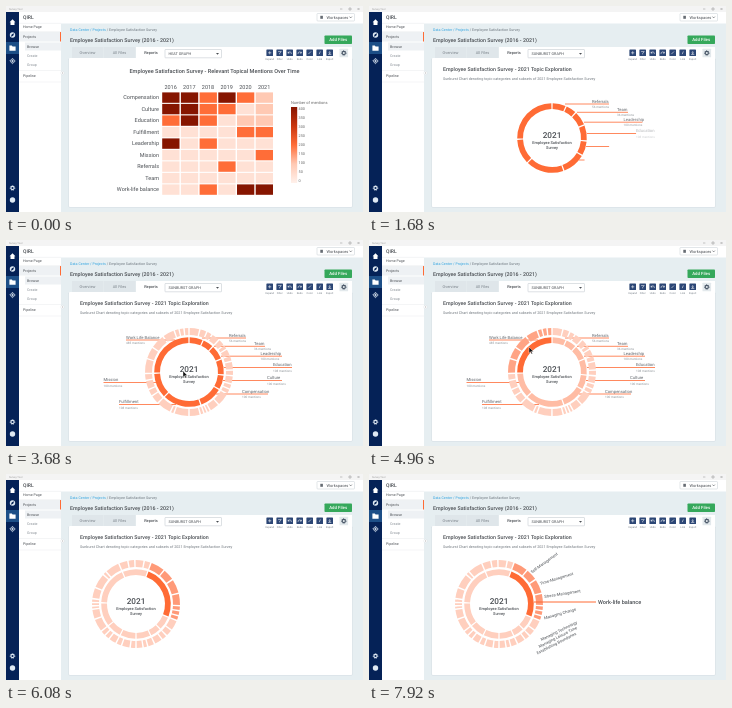
An HTML page that plays this animation: 357x206 px, repeating every 8000 ms.

```html
<!DOCTYPE html>
<html lang="en">
<head>
<meta charset="utf-8">
<title>Survey report</title>
<style>
html, body { margin: 0; width: 100%; height: 100%; overflow: hidden; background: #e6eef1; }
svg { display: block; width: 100vw; height: 100vh; font-family: Roboto, Arial, sans-serif; text-rendering: geometricPrecision; }
</style>
</head>
<body>
<svg id="stage" viewBox="0 0 357 206"></svg>
<script>
const LOOP = 8000;
const ORANGE = '#ff6b35', PALE = '#ffcfbe', SOFT = '#ff9a78', INK = '#4a4e53', NAVY = '#052257';
const stage = document.getElementById('stage');

function el(parent, tag, attrs = {}, content) {
  const node = document.createElementNS('http://www.w3.org/2000/svg', tag);
  for (const key in attrs) node.setAttribute(key, attrs[key]);
  if (content !== undefined) node.textContent = content;
  return parent.appendChild(node);
}
const set = (node, attrs) => { for (const key in attrs) node.setAttribute(key, attrs[key]); };
const group = (parent = stage) => el(parent, 'g');
const rect = (p, x, y, width, height, fill, more) => el(p, 'rect', { x, y, width, height, fill, ...more });
const text = (p, x, y, size, str, fill = INK, more) => el(p, 'text', { x, y, 'font-size': size, fill, ...more }, str);
const stroke = (p, d, color, width, more) => el(p, 'path', { d, fill: 'none', stroke: color, 'stroke-width': width, ...more });
const MID = { 'text-anchor': 'middle' }, END = { 'text-anchor': 'end' }, BOLD = { 'font-weight': 500 };

const clamp = v => Math.min(1, Math.max(0, v));
const ramp = (t, a, b) => clamp((t - a) / (b - a));
const ease = v => v * v * (3 - 2 * v);
const lerp = (a, b, k) => a + (b - a) * k;
const hex = c => [1, 3, 5].map(i => parseInt(c.slice(i, i + 2), 16));
function mix(a, b, k) {
  const x = hex(a), y = hex(b);
  return `rgb(${x.map((v, i) => Math.round(lerp(v, y[i], k)))})`;
}

// Application frame
function drawChrome() {
  const g = group();
  rect(g, 0, 0, 357, 206, '#e6eef1');
  rect(g, 0, 0, 357, 6, '#f4f4f4');
  text(g, 3, 4.2, 2.6, 'Survey Tool', '#999');
  stroke(g, 'M334 3h2.4M343 2h2v2h-2zM351.5 2l2 2m0-2l-2 2', '#777', 0.4);
  rect(g, 13, 6, 344, 11.5, '#fff');
  text(g, 17, 13.4, 5, 'QIRL', INK, BOLD);
  rect(g, 311, 7.5, 37.5, 7.5, '#fff', { stroke: '#b5bfc7', 'stroke-width': 0.4, rx: 0.8 });
  rect(g, 314.3, 9.8, 2.6, 3, '#666c73');
  text(g, 320.5, 12.8, 4, 'Workspaces');
  stroke(g, 'M343.5 10.6l1.2 1.3l1.2-1.3', INK, 0.6);

  rect(g, 0, 6, 13, 200, NAVY);
  rect(g, 0, 36, 13, 12, '#1d4f87');
  el(g, 'path', { d: 'M3.6 16.2L6.5 13.3l2.9 2.9h-.9V19H4.5v-2.8z', fill: '#fff' });
  el(g, 'circle', { cx: 6.5, cy: 29, r: 2.7, fill: '#dfe9f3' });
  el(g, 'path', { d: 'M8.2 27.3l-1 2.4l-2.4 1l1-2.4z', fill: NAVY });
  el(g, 'path', { d: 'M3.4 39.6h2.4l.8.9h3v4.2H3.4z', fill: '#fff' });
  stroke(g, 'M6.5 52.3l2.7 2.7l-2.7 2.7l-2.7-2.7zM6.5 53.5v3M5 55h3', '#dfe9f3', 0.8);
  drawGear(g, 6.5, 182, '#dfe9f3');
  el(g, 'circle', { cx: 6.5, cy: 194, r: 2.7, fill: '#dfe9f3' });

  rect(g, 13, 17, 42, 189, '#fff');
  rect(g, 13, 26, 42, 9.5, '#eef1f4');
  rect(g, 54, 26, 1, 9.5, ORANGE);
  rect(g, 19, 36.5, 36, 8, '#eef1f4');
  stroke(g, 'M13 17.4h42M13 25.6h42M13 64.5h42M13 76h42', '#e2e6e9', 0.4);
  [[17, 22, 'Home Page'], [17, 31.8, 'Projects'], [21, 41.8, 'Browse'], [21, 50.8, 'Create'],
   [21, 59.6, 'Group'], [17, 71.2, 'Pipeline']]
    .forEach(([x, y, s], i) => text(g, x, y, 3.6, s, i == 3 || i == 4 ? '#858c93' : INK));
  el(g, 'circle', { cx: 56.5, cy: 67, r: 1.8, fill: '#fff', stroke: '#ccd4da', 'stroke-width': 0.3 });
  stroke(g, 'M56.9 66.2l-.8.8l.8.8', '#777', 0.4);

  const crumbs = text(g, 64, 25.2, 3.65, 'Data Center / Projects', '#2fa3e0');
  el(crumbs, 'tspan', { fill: '#6b747c' }, ' / Employee Satisfaction Survey');
  text(g, 64, 36.3, 5.3, 'Employee Satisfaction Survey (2016 - 2021)', INK, BOLD);
  rect(g, 318.5, 29.5, 27.5, 8.6, '#35a85b', { rx: 0.8 });
  text(g, 332.2, 35.4, 4.3, 'Add Files', '#fff', { ...MID, ...BOLD });

  rect(g, 62.5, 52.3, 284, 149.3, '#d6dee3', { rx: 1 });
  rect(g, 63, 52, 283, 149, '#fff', { rx: 0.8 });
  rect(g, 66, 41, 31.5, 11, '#dfe6ea');
  rect(g, 98, 41, 31.5, 11, '#dfe6ea');
  rect(g, 130, 41, 216, 12, '#fff');
  text(g, 81.5, 47.8, 3.9, 'Overview', '#7b838a', MID);
  text(g, 113.5, 47.8, 3.9, 'All Files', '#7b838a', MID);
  text(g, 145, 47.8, 3.9, 'Reports', INK, { ...MID, ...BOLD });
  rect(g, 159, 43.5, 56.5, 8.3, '#fff', { stroke: '#aab3ba', 'stroke-width': 0.4, rx: 0.5 });
  el(g, 'path', { d: 'M210 47h3l-1.5 1.7z', fill: INK });

  const glyphs = ['M-2 0h4M0-2v4', 'M-2-1.5h4l-2 2v1.5', 'M2 1.4a2 2 0 0 0-4-1m0-1.7v1.7h1.7', 'M-2 1.4a2 2 0 0 1 4-1m0-1.7v1.7h-1.7',
    'M-1.6 1.6l3.2-3.2', 'M-.6 1.7L.8-1.7', 'M0-2v3m-1.3-1.2L0 1l1.3-1.2M-2 2h4'];
  ['Expand', 'Filter', 'Undo', 'Redo', 'Color', 'Link', 'Export'].forEach((name, i) => {
    const x = 263.7 + i * 10;
    rect(g, x - 3.3, 43.5, 6.6, 6.6, '#2c4675', { rx: 0.6 });
    stroke(g, glyphs[i], '#fff', 0.7, { transform: `translate(${x} 46.8) scale(.8)` });
    text(g, x, 54.3, 2.6, name, '#727a83', MID);
  });
  rect(g, 333.5, 42.7, 8.6, 8.6, '#e3e9ec', { rx: 0.6 });
  drawGear(g, 337.8, 47, '#4a5768');
  return text(g, 162.5, 49.3, 3.8, '', INK);
}

function drawGear(p, cx, cy, color) {
  el(p, 'circle', { cx, cy, r: 1.6, fill: 'none', stroke: color, 'stroke-width': 1.1 });
  el(p, 'circle', { cx, cy, r: 2.3, fill: 'none', stroke: color, 'stroke-width': 0.8, 'stroke-dasharray': '.9 .906' });
}

// Heat graph
function drawHeat() {
  const g = group();
  const shades = ['#fff1eb', '#ffe1d5', '#ffc9b3', '#ff6d38', '#c9360e', '#861500'];
  const rows = { Compensation: '553532', Culture: '553312', Education: '353122', Fulfillment: '111133', Leadership: '513111',
    Mission: '111113', Referrals: '111311', Team: '111111', 'Work-life balance': '113155' };
  text(g, 208.5, 67, 5.55, 'Employee Satisfaction Survey - Relevant Topical Mentions Over Time', INK, { ...MID, ...BOLD });
  for (let c = 0; c < 6; c++) text(g, 164.6 + c * 18.7, 82.9, 5.5, 2016 + c, INK, MID);
  Object.entries(rows).forEach(([name, levels], r) => {
    const y = 86.4 + r * 11.5;
    text(g, 153, y + 6.9, 5.5, name, INK, END);
    [...levels].forEach((n, c) => rect(g, 156.2 + c * 18.7, y, 17.3, 10.4, shades[n]));
  });
  const grad = el(g, 'linearGradient', { id: 'scale', x2: 0, y2: 1 });
  [5, 4, 3, 2, 0].forEach((n, i) => el(grad, 'stop', { offset: i / 4, 'stop-color': shades[n] }));
  text(g, 285, 97.6, 4, 'Number of mentions', '#666');
  rect(g, 285, 101, 6.2, 76, 'url(#scale)');
  for (let i = 0; i < 9; i++) text(g, 292.5, 104 + i * 9, 3.8, 400 - i * 50, '#666');
  return g;
}

// Sunburst: name, end angle, mentions, relative sizes of the outer parts
const topics = [
  ['Referrals', 24, 56, [3, 2]], ['Team', 43, 36, [2, 3]], ['Leadership', 68, 100, [3, 2, 3]],
  ['Education', 95, 108, [2, 3, 2]], ['Culture', 120, 100, [3, 2, 2]], ['Compensation', 160, 100, [4, 3, 1, 1]],
  ['Fulfillment', 225, 108, [1, 3, 4, 1, 4]], ['Mission', 268, 100, [4, 3, 4, 3]], ['Work Life Balance', 360, 485, [6, 5, 6, 5, 2, 2, 2]]
];
// text x, line y, line far end, line near end
const spots = [[223, 98, 240, 196], [248, 106.3, 259, 208], [254.5, 116.2, 276, 215], [267, 127.5, 286, 218], [261, 140.5, 276, 217],
  [236, 154, 262, 210], [113, 164.5, 113, 170], [97.5, 142.5, 97.5, 150], [120, 100, 120, 169]];
// name, start x, start y, turn
const subtopics = [
  ['Self-Management', 163, 99.5, -36], ['Time-Management', 171.5, 111, -17], ['Stress-Management', 175.5, 124, -9],
  ['Managing Change', 175.5, 145.5, -16], ['Managing Technology', 172.5, 167, -26],
  ['Managing Leisure Time', 170.5, 174, -27], ['Establishing Boundaries', 168.5, 180.5, -27]
];

function wedge(r0, r1, a, b) {
  const at = (r, deg) => {
    const q = (deg - 90) * Math.PI / 180;
    return `${(r * Math.cos(q)).toFixed(2)} ${(r * Math.sin(q)).toFixed(2)}`;
  };
  const big = b - a > 180 ? 1 : 0;
  return `M${at(r1, a)}A${r1} ${r1} 0 ${big} 1 ${at(r1, b)}L${at(r0, b)}A${r0} ${r0} 0 ${big} 0 ${at(r0, a)}Z`;
}

function drawSunburst() {
  const root = group();
  text(root, 74, 65, 5.3, 'Employee Satisfaction Survey - 2021 Topic Exploration', INK, BOLD);
  text(root, 74, 73.8, 3.72, 'Sunburst Chart denoting topic categories and subsets of 2021 Employee Satisfaction Survey', '#6f767d');
  const notes = group(root), body = group(root), spin = group(body), outer = group(spin), inner = group(spin);
  const arcs = [], parts = [], labels = [];
  let a = 0;
  topics.forEach(([name, b, count, sizes], i) => {
    arcs.push({ node: el(inner, 'path'), a: a + 1.1, b: b - 1.1 });
    const total = sizes.reduce((x, y) => x + y);
    let from = a;
    sizes.forEach(size => {
      const to = from + (b - a) * size / total;
      parts.push({ node: el(outer, 'path', { d: wedge(37, 44, from + 1, to - 1) }), topic: i });
      from = to;
    });
    a = b;
    const g = group(notes), [x, y, far, near] = spots[i];
    const line = stroke(g, '', ORANGE, 0.8);
    const words = group(g);
    text(words, x, y - 1.2, 4.2, name, '#60656b');
    text(words, x, y + 4, 3.1, count + ' mentions', '#8a9096');
    labels.push({ g, line, words, y, far, near });
  });
  text(body, 0, -0.4, 8.2, '2021', INK, { ...MID, ...BOLD });
  text(body, 0, 5.7, 3.95, 'Employee Satisfaction', INK, { ...MID, ...BOLD });
  text(body, 0, 10.8, 3.95, 'Survey', INK, { ...MID, ...BOLD });
  const details = subtopics.map(([s, x, y, turn]) =>
    text(root, 0, 0, 4.1, s, INK, { transform: `translate(${x} ${y}) rotate(${turn})` }));
  const callLine = stroke(root, '', ORANGE, 1);
  const callText = text(root, 229, 130.2, 5.55, 'Work-life balance', INK, BOLD);
  return { root, body, spin, outer, arcs, parts, labels, details, callLine, callText };
}

const picker = drawChrome();
const heat = drawHeat();
const sun = drawSunburst();
const cursor = el(stage, 'path', { d: 'M0 0v6.2l1.5-1.4l1 2.3l1-.4l-1-2.3h2z', fill: '#111', stroke: '#fff', 'stroke-width': 0.4 });

function render(t) {
  const showSun = t >= 480;
  picker.textContent = showSun ? 'SUNBURST GRAPH' : 'HEAT GRAPH';
  heat.style.display = showSun ? 'none' : '';
  sun.root.style.display = showSun ? '' : 'none';

  const sweep = 360 * ease(ramp(t, 480, 900));
  const focus = ease(ramp(t, 4600, 5100));
  const move = ease(ramp(t, 4950, 5900));
  set(sun.body, { transform: `translate(${lerp(183, 130, move)} ${lerp(132, 130, move)})` });
  set(sun.spin, { transform: `rotate(${112 * move})` });
  set(sun.outer, { opacity: ease(ramp(t, 2150, 3000)) });

  sun.arcs.forEach(({ node, a, b }, i) => {
    const end = Math.min(b, sweep);
    set(node, { d: end > a ? wedge(29, 34.8, a, end) : '', fill: i == 8 ? ORANGE : mix(ORANGE, PALE, focus) });
  });
  sun.parts.forEach(({ node, topic }) => set(node, { fill: topic == 8 ? mix(PALE, SOFT, focus) : PALE }));

  const fade = 1 - ease(ramp(t, 5100, 5900));
  sun.labels.forEach(({ g, line, words, y, far, near }, i) => {
    const k = ease(ramp(t, 1150 + i * 90, 1550 + i * 90));
    set(g, { opacity: fade * (k > 0 ? 1 : 0) });
    set(line, { d: `M${near} ${y}H${lerp(near, far, k)}` });
    set(words, { opacity: ramp(k, 0.5, 1) });
  });

  sun.details.forEach((node, i) => set(node, { opacity: ease(ramp(t, 6350 + i * 110, 6700 + i * 110)) }));
  const call = ease(ramp(t, 6900, 7400));
  set(sun.callLine, { d: `M165 128H${lerp(165, 227, call)}`, opacity: call > 0 ? 1 : 0 });
  set(sun.callText, { opacity: ease(ramp(t, 7200, 7600)) });

  const come = ease(ramp(t, 3250, 3650)), go = ease(ramp(t, 3750, 4450));
  const x = lerp(lerp(205, 177, come), 160, go), y = lerp(lerp(165, 131, come), 107, go);
  set(cursor, { transform: `translate(${x} ${y})`, opacity: ramp(t, 3250, 3400) * (1 - ramp(t, 5000, 5200)) });
}

const start = performance.now();
function tick() {
  render((performance.now() - start) % LOOP);
  requestAnimationFrame(tick);
}
tick();
</script>
</body>
</html>
```
